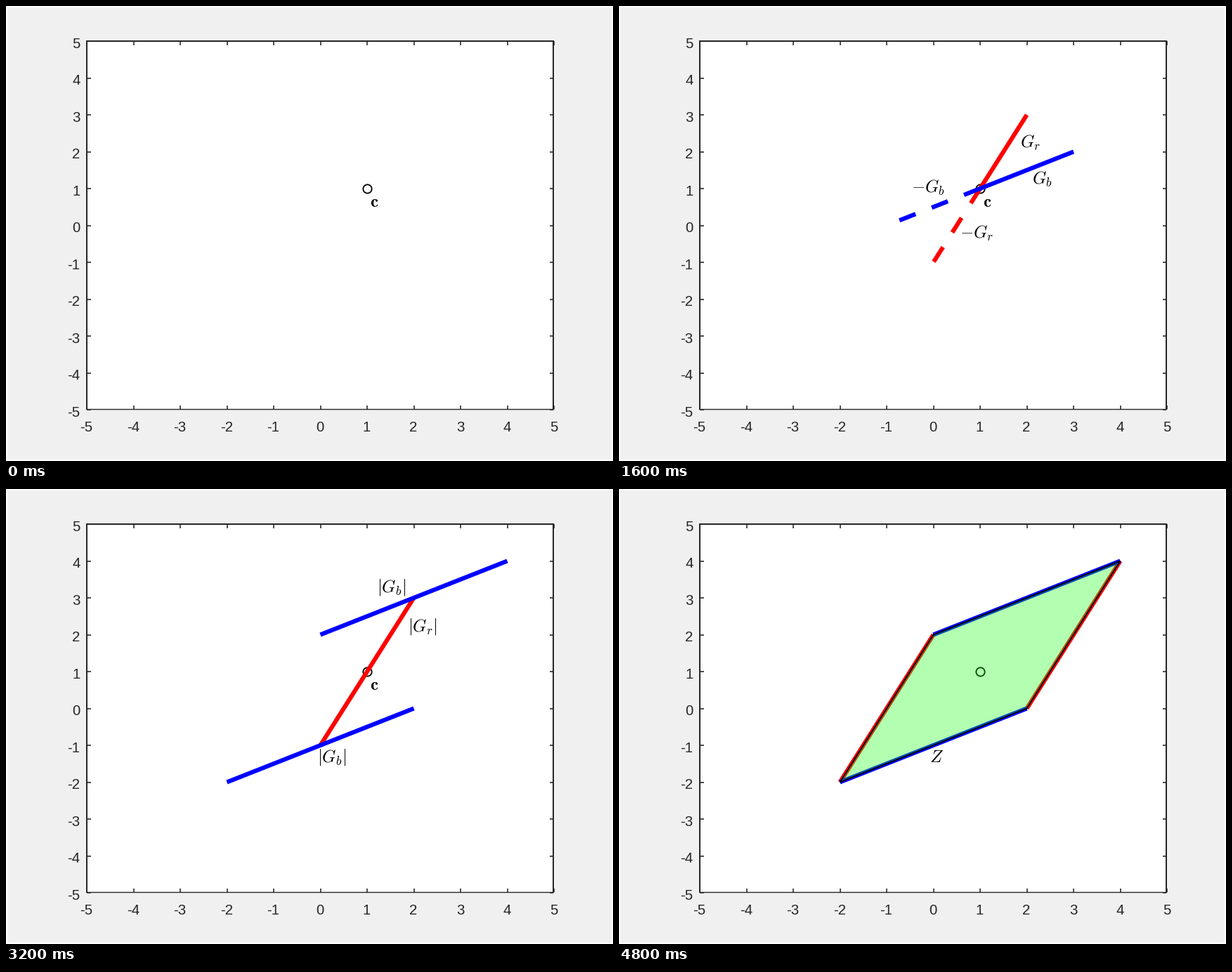
A matplotlib script that plays this animation: 864x648 px, repeating every 5.6 s.

```python
import matplotlib.pyplot as plt
import numpy as np
from matplotlib.animation import FuncAnimation
from matplotlib.patches import Polygon, Rectangle

W, H, DPI = 864, 648, 100
PT = 72 / DPI  # points per pixel
INK = "#262626"
RED, BLUE = "#ff0000", "#0000ff"
STEPS = 7

plt.rcParams["mathtext.fontset"] = "cm"
plt.rcParams["font.family"] = "Liberation Sans"

fig = plt.figure(figsize=(W / DPI, H / DPI), dpi=DPI, facecolor="white")
ax = fig.add_axes([0, 0, 1, 1])
ax.set_xlim(0, W)
ax.set_ylim(H, 0)
ax.axis("off")

parts = []  # (artist, steps in which it is visible)


def to_px(p):
    """Plot units to stage pixels."""
    p = np.asarray(p, float)
    return np.array([447.5, 312.5]) + p * [66.5, -52.5]


def rule(x0, y0, x1, y1, width=2, cap="projecting"):
    ax.plot([x0, x1], [y0, y1], color=INK, lw=width * PT,
            solid_capstyle=cap, zorder=0.5)


def tick(x0, y0, x1, y1):
    rule(x0, y0, x1, y1, 1.6, "butt")


def draw_frame():
    ax.add_patch(Rectangle((2, 2), W - 4, H - 4, fc="#f0f0f0", ec="none", zorder=0))
    left, right, top, bottom = 115, 779, 50, 574
    ax.add_patch(Rectangle((left, top), right - left, bottom - top,
                           fc="white", ec="none", zorder=0.1))
    rule(left, top, right, top)
    rule(left, top, left, bottom)
    rule(right, top, right, bottom)
    rule(left, bottom, right, bottom, 1.4)
    for v in range(-5, 6):
        x, y = to_px((v, v))
        tick(x, bottom, x, bottom - 5)
        tick(x, top, x, top + 6)
        tick(left, y, left + 6, y)
        tick(right, y, right - 5, y)
        style = dict(color=INK, fontsize=20.4 * PT, va="baseline")
        ax.text(x - 0.5, 605.5, str(v), ha="center", **style)
        ax.text(105.5, y + 9.6, str(v), ha="right", **style)


def segment(a, b, color, steps, dashed=False):
    (x0, y0), (x1, y1) = to_px(a), to_px(b)
    line, = ax.plot([x0, x1], [y0, y1], color=color, lw=6.17 * PT,
                    ls=(0, (4, 4)) if dashed else "-",
                    solid_capstyle="butt", dash_capstyle="butt",
                    zorder=2 if color == RED else 3)
    parts.append((line, steps))


def label(x, y, tex, steps):
    text = ax.text(x, y, f"${tex}$", fontsize=24.7 * PT, color="black",
                   ha="left", va="baseline", zorder=5)
    parts.append((text, steps))


draw_frame()

# Centre point
cx, cy = to_px((1, 1))
ax.plot([cx], [cy], "o", ms=12.3 * PT, mfc="none", mec="black",
        mew=1.8 * PT, zorder=1)
label(518.5, 286, r"\mathbf{c}", range(6))

# Generators, then their mirrored halves
segment((1, 1), (2, 3), RED, [1, 2])
segment((1, 1), (3, 2), BLUE, [1, 2])
label(571, 202, "G_r", [1, 2])
label(588, 254, "G_b", [1, 2])
segment((1, 1), (0, -1), RED, [2], dashed=True)
segment((1, 1), (-1, 0), BLUE, [2], dashed=True)
label(416, 266, "-G_b", [2])
label(485, 331, "-G_r", [2])

# Full segments through the centre
segment((0, -1), (2, 3), RED, [3, 4])
segment((-1, 0), (3, 2), BLUE, [3])
label(572, 202, "|G_r|", [3, 4])
label(588.5, 254, "|G_b|", [3])

# Sides of the parallelogram
segment((0, 2), (4, 4), BLUE, [4, 5, 6])
segment((-2, -2), (2, 0), BLUE, [4, 5, 6])
label(528, 146, "|G_b|", [4, 5])
label(443, 389, "|G_b|", [4, 5])
segment((-2, -2), (0, 2), RED, [5, 6])
segment((2, 0), (4, 4), RED, [5, 6])
label(658, 223, "|G_r|", [5])
label(338, 307, "|G_r|", [5])

# Filled set
corners = to_px([(-2, -2), (0, 2), (4, 4), (2, 0)])
area = ax.add_patch(Polygon(corners, fc=(0, 1, 0, 0.3), ec="none", zorder=4))
edge = ax.add_patch(Polygon(corners, fill=False, ec="black", lw=1.8 * PT, zorder=4.1))
parts += [(area, [6]), (edge, [6])]
label(442.5, 389, "Z", [6])


def update(step):
    for artist, steps in parts:
        artist.set_visible(step in steps)
    return [artist for artist, _ in parts]


anim = FuncAnimation(fig, update, frames=STEPS, interval=800,
                     init_func=lambda: update(0), repeat=True,
                     repeat_delay=0, blit=False)
plt.show()
```
